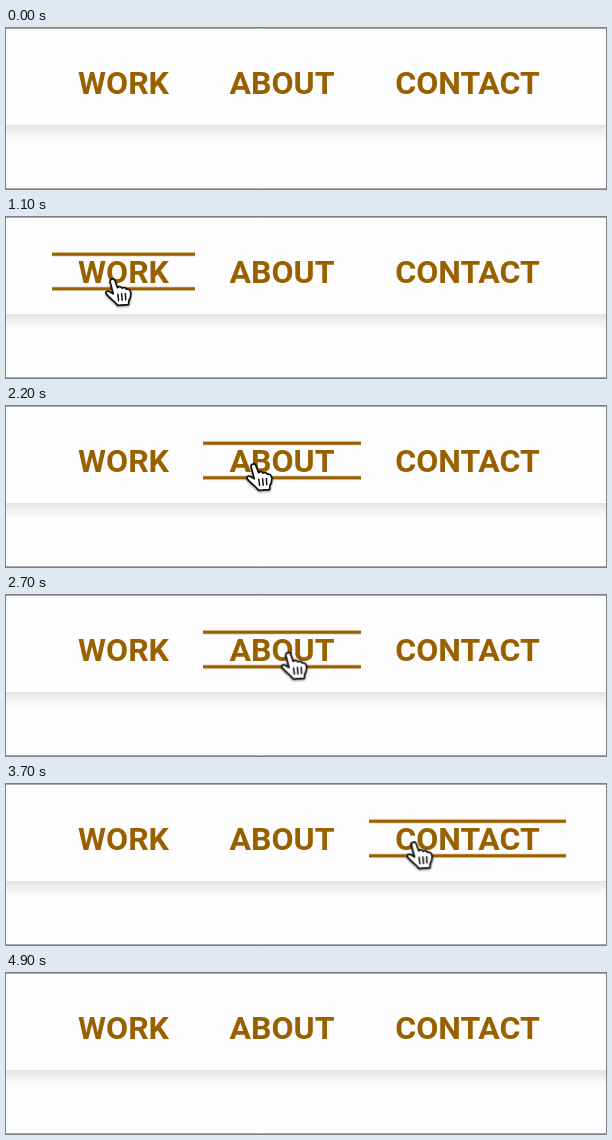
Recreate the animation shown at these times as an HTML page. Size 600 by 161 pixels, loop 5.2 s.

```html
<!DOCTYPE html>
<html lang="en">
<head>
<meta charset="utf-8">
<title>Navigation hover</title>
<style>
  html, body { margin: 0; width: 100%; height: 100%; overflow: hidden; background: #fefdfe; }
  svg { display: block; width: 600px; height: 161px; }
  text { font: 700 32px Roboto, sans-serif; text-anchor: middle; }
  .tab { fill: #996000; }
  .bar { opacity: 0; }
  .hand { filter: drop-shadow(0 1.5px 1.2px rgba(0, 0, 0, .45)); }
</style>
</head>
<body>
<svg viewBox="0 0 600 161">
  <defs>
    <linearGradient id="shade" x2="0" y2="1">
      <stop offset="0" stop-color="#e3e2e3"/>
      <stop offset=".35" stop-color="#f0eff0"/>
      <stop offset="1" stop-color="#fefdfe"/>
    </linearGradient>
  </defs>
  <rect y="97" width="600" height="16" fill="url(#shade)"/>
  <path d="M0 .5H600M0 160.5H600" stroke="#a9a9a9"/>
  <g id="tabs"></g>
  <g id="cursor" opacity="0">
    <g class="hand" fill="#fff" stroke="#111" stroke-width="1.7" stroke-linejoin="round" stroke-linecap="round">
      <path d="M5.2 4.2C4.4 1 8.8 -.4 10 2.8L12.5 9.6C13.6 8.2 16.3 8.4 17 10.2C18.4 9 20.8 9.6 21.3 11.2C23.4 10.6 25.3 11.9 25.7 14.4C26.2 18 25.4 20.4 23.9 22.8L23.6 26.6L12.6 27.3C10.4 24 6.8 21.8 4.2 19.2L1.6 16.4C-.1 14 2.2 12.3 4.4 13.6L8.2 15.8Z"/>
      <path d="M12.8 16.2L13.6 22.4M16.6 15.8L17.2 22.2M20.4 15.6L20.7 21.8" fill="none" stroke-width="1.5"/>
    </g>
  </g>
</svg>
<script>
const LOOP = 5200, TICK = 100, FADE = 500, MID = 54.5, REACH = 17.3;
const clips = [];

function play(el, frames) {
  const clip = el.animate(frames, { duration: LOOP, iterations: Infinity });
  clip.pause();
  clips.push(clip);
}

function add(parent, tag, attrs) {
  const el = document.createElementNS("http://www.w3.org/2000/svg", tag);
  for (const key in attrs) el.setAttribute(key, attrs[key]);
  return parent.appendChild(el);
}

// Two bars part from the middle of the label while hovered.
function addTab(label, x, width, enter, leave) {
  const tab = add(tabs, "g", { class: "tab" });
  for (const side of [-1, 1]) {
    const bar = add(tab, "rect", { class: "bar", x, y: MID - 1.7, width, height: 3.4 });
    const pose = (t, open) => ({
      offset: t / LOOP, easing: "ease", opacity: open,
      transform: `translateY(${side * REACH * open}px)`
    });
    play(bar, [
      pose(0, 0), pose(enter, 0), pose(enter + FADE, 1),
      pose(leave, 1), pose(leave + FADE, 0), pose(LOOP, 0)
    ]);
  }
  add(tab, "text", { x: x + width / 2, y: 66 }).textContent = label;
}

addTab("WORK", 46, 143, 520, 1710);
addTab("ABOUT", 197, 158, 1730, 2840);
addTab("CONTACT", 363, 197, 2867, 4260);

// time, x, y, easing towards the next stop
const stops = [
  [500, 19, 106, "ease-out"],
  [950, 99, 61, "linear"],
  [1350, 99, 61, "ease-in"],
  [1700, 175, 59, "ease-out"],
  [2000, 240, 57, "linear"],
  [2550, 240, 57, "ease-in"],
  [2850, 350, 56, "ease-out"],
  [3050, 398, 57, "linear"],
  [3650, 398, 57, "ease-in-out"],
  [4200, 539, 67, "linear"],
  [4300, 576, 77, "linear"],
  [4400, 640, 90, "linear"]
];
const place = ([t, x, y, easing], opacity = 1) => ({
  offset: t / LOOP, easing, opacity, transform: `translate(${x}px, ${y}px)`
});
const first = stops[0], last = stops[stops.length - 1];
play(cursor, [
  place([0, first[1], first[2], "step-end"], 0),
  ...stops.map(s => place(s)),
  place([last[0], last[1], last[2], "linear"], 0),
  place([LOOP, last[1], last[2], "linear"], 0)
]);

function draw() {
  const t = Math.floor(performance.now() % LOOP / TICK) * TICK;
  for (const clip of clips) clip.currentTime = t;
  requestAnimationFrame(draw);
}
draw();
</script>
</body>
</html>
```
